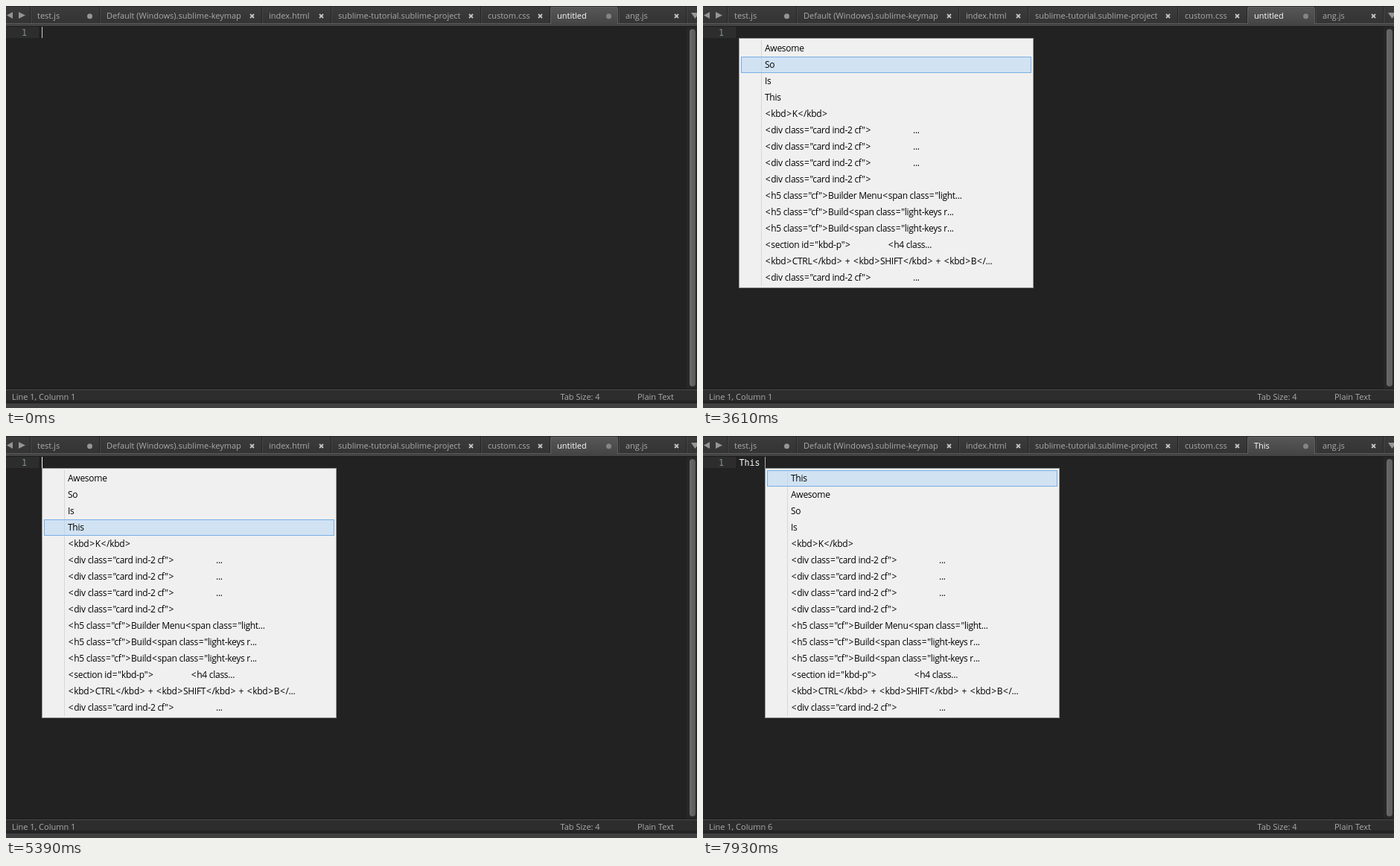
Recreate the animation shown at these times as an HTML page. Size 928 by 540 pixels, loop 8 s.

```html
<!DOCTYPE html>
<html lang="en">
<head>
<meta charset="utf-8">
<title>Paste from history</title>
<style>
  html, body { margin: 0; width: 100%; height: 100%; overflow: hidden; background: #222; }
  svg { display: block; width: 928px; height: 540px; }
  text { white-space: pre; }
  .ui { font: 11px "Open Sans", "Noto Sans", sans-serif; fill: #aaa; }
  .active { fill: #fff; }
  .code { font: 11.63px "DejaVu Sans Mono", monospace; fill: #f8f8f8; }
  .menu { font: 12px "Open Sans", "Noto Sans", sans-serif; letter-spacing: -.27px; fill: #000; }
  .sym { letter-spacing: .7px; }
</style>
</head>
<body>
<svg id="stage" viewBox="0 0 928 540" xmlns="http://www.w3.org/2000/svg">
  <defs>
    <linearGradient id="tabFill" x2="0" y2="1">
      <stop stop-color="#3c3c3c"/><stop offset="1" stop-color="#333"/>
    </linearGradient>
    <linearGradient id="activeFill" x2="0" y2="1">
      <stop stop-color="#575757"/><stop offset="1" stop-color="#454545"/>
    </linearGradient>
    <linearGradient id="thumbFill">
      <stop stop-color="#6c6c6c"/><stop offset="1" stop-color="#5a5a5a"/>
    </linearGradient>
  </defs>
</svg>
<script>
const stage = document.getElementById('stage');
const LOOP = 8000;

function add(name, attrs, parent = stage, content = '') {
  const el = document.createElementNS('http://www.w3.org/2000/svg', name);
  for (const key in attrs) el.setAttribute(key, attrs[key]);
  el.textContent = content;
  return parent.appendChild(el);
}
const rect = (x, y, width, height, fill, parent, more) =>
  add('rect', { x, y, width, height, fill, ...more }, parent);
const path = (d, attrs) => add('path', { d, ...attrs });
const label = (x, y, content, cls, parent) =>
  add('text', { x, y, class: cls }, parent, content);

// Editor area
rect(0, 0, 928, 540, '#222');
rect(0, 28, 44, 15, '#2d2d2d');
label(21, 40, '1', 'code').style.fill = '#7f9090';

// Tab strip
rect(0, 0, 928, 24, 'url(#tabFill)');
rect(0, 0, 928, 1, '#2b2b2b');
rect(0, 23, 928, 1, '#5a5a5a');
rect(0, 24, 928, 3, '#434343');
rect(0, 27, 928, 1, '#1b1b1b');
path('M9 8V17L1 12.5ZM17 8V17L26 12.5Z', { fill: '#959595' });
path('M920 9H931L925.5 17Z', { fill: '#959595' });

const tabs = [
  [33, 'test.js', 'dot'], [126, 'Default (Windows).sublime-keymap'], [344, 'index.html'],
  [437, 'sublime-tutorial.sublime-project'], [638, 'custom.css'],
  [731, 'untitled', 'dot'], [823, 'ang.js'], [914]
];
let title;
tabs.forEach(([x, name, mark], i) => {
  rect(x - 1, 1, 1, 22, '#252525');
  rect(x, 1, 1, 22, '#474747');
  if (!name) return;
  const active = i === 5, end = tabs[i + 1][0];
  if (active) {
    path('M731 25V4Q731 1 734 1H819Q822 1 822 4V25Z', { fill: 'url(#activeFill)' });
    path('M731.5 24V4Q731.5 1.5 734 1.5H819Q821.5 1.5 821.5 4V24', { fill: 'none', stroke: '#626262' });
  }
  const text = label(x + 9, 17, name, active ? 'ui active' : 'ui');
  if (active) title = text;
  const cx = end - 13.5;
  if (mark) add('circle', { cx, cy: 13.8, r: 3.5, fill: active ? '#858585' : '#969696' });
  else path(`M${cx - 2.5} 11l5 5m0-5l-5 5`, { stroke: '#c4c4c4', 'stroke-width': 1.8 });
});

// Scrollbar
rect(914, 28, 14, 487, '#272727');
rect(918, 31, 8, 480, 'url(#thumbFill)', stage, { rx: 4 });

// Status bar
rect(0, 514, 928, 1, '#1c1c1c');
rect(0, 515, 928, 1, '#4a4a4a');
rect(0, 516, 928, 18, '#2d2d2d');
rect(0, 530, 928, 4, '#242424');
rect(0, 534, 928, 6, '#404040');
const status = label(8, 529, '', 'ui');
label(744.5, 529, 'Tab Size: 4', 'ui');
label(848, 529, 'Plain Text', 'ui');

const code = label(48.5, 40, '', 'code');
const caret = rect(48, 28, 1, 15, '#f8f8f2');

// Popup menu, laid out from its own top left corner
const menu = add('g', {});
rect(.5, .5, 395, 335, '#f0f0f0', menu, { stroke: '#979797' });
rect(30, 3, 1, 330, '#d7d7d7', menu);
const bar = rect(3.5, 0, 389, 21, '#d1e2f2', menu, { stroke: '#78aee5' });
const barSplit = rect(30, 0, 1, 20, '#c3d6e8', menu);

const card = '<div class="card ind-2 cf">';
const build = '<h5 class="cf">Build<span class="light-keys r...';
const snippets = [
  ['<kbd>K</kbd>'], [card, 199, '...'], [card, 199, '...'], [card, 199, '...'], [card],
  ['<h5 class="cf">Builder Menu<span class="light...'], [build], [build],
  ['<section id="kbd-p">', 165, '<h4 class...'],
  ['<kbd>CTRL</kbd> + <kbd>SHIFT</kbd> + <kbd>B</...'], [card, 199, '...']
];

// Math signs take a wider cell than the letters
function menuText(x, y, content) {
  const el = label(x, y, '', 'menu', menu);
  for (const part of content.split(/([<>=+])/)) {
    if (!part) continue;
    const sym = '<>=+'.includes(part);
    add('tspan', sym ? { class: 'sym', dx: .68 } : {}, el, part);
  }
  return el;
}
const rowY = i => 18 + 22 * i;
const recent = [0, 1, 2, 3].map(i => label(35, rowY(i), '', 'menu', menu));
snippets.forEach(([content, gap, rest], i) => {
  menuText(35, rowY(i + 4), content);
  if (rest) menuText(35 + gap, rowY(i + 4), rest);
});

// time, caret opacity, typed text, menu row (-1: open without selection)
const steps = [
  [0, .8, ''], [120, 1, ''], [390, .5, ''], [510, 0, ''],
  [1060, .35, ''], [1210, .8, ''], [1330, 1, ''],
  [1480, 1, 'k'], [1880, .55, 'k'], [2030, .15, 'k'],
  [2150, 1, ''], [2420, .5, ''], [2550, 0, ''],
  [2810, 0, '', -1], [3090, .4, '', -1], [3210, .8, '', 0], [3330, 1, '', 0],
  [3610, 0, '', 1], [3750, 0, '', 2], [3880, 0, '', 3],
  [4180, .4, '', 2], [4330, .85, '', 1], [4450, 1, '', 1], [4600, .4, '', 1], [4730, 0, '', 1],
  [5130, .35, '', 2], [5270, .8, '', 3], [5390, 1, '', 3],
  [5510, 1, 'This'], [5940, .4, 'This'], [6070, 0, 'This'],
  [6530, 1, 'This '], [6810, .6, 'This '], [6960, .2, 'This '], [7080, 0, 'This '],
  [7540, .4, 'This ', -1], [7690, 1, 'This ', -1], [7930, .65, 'This ', 0]
];

let shown;
function draw(step) {
  const [, alpha, typed, row] = step;
  const x = 48 + 7 * typed.length;
  code.textContent = typed;
  title.textContent = typed.trim() || 'untitled';
  status.textContent = `Line 1, Column ${typed.length + 1}`;
  caret.setAttribute('x', x);
  caret.setAttribute('opacity', alpha);

  const open = row !== undefined;
  menu.setAttribute('visibility', open ? 'visible' : 'hidden');
  if (!open) return;
  menu.setAttribute('transform', `translate(${x} 43)`);
  const words = typed ? ['This', 'Awesome', 'So', 'Is'] : ['Awesome', 'So', 'Is', 'This'];
  words.forEach((word, i) => recent[i].textContent = word);
  bar.setAttribute('y', 3.5 + 22 * row);
  barSplit.setAttribute('y', 4 + 22 * row);
  for (const el of [bar, barSplit]) el.setAttribute('opacity', row < 0 ? 0 : 1);
}

const start = performance.now();
function tick() {
  const t = (performance.now() - start) % LOOP;
  const step = steps.findLast(s => s[0] <= t) || steps[0];
  if (step !== shown) draw(shown = step);
  requestAnimationFrame(tick);
}
tick();
</script>
</body>
</html>
```
